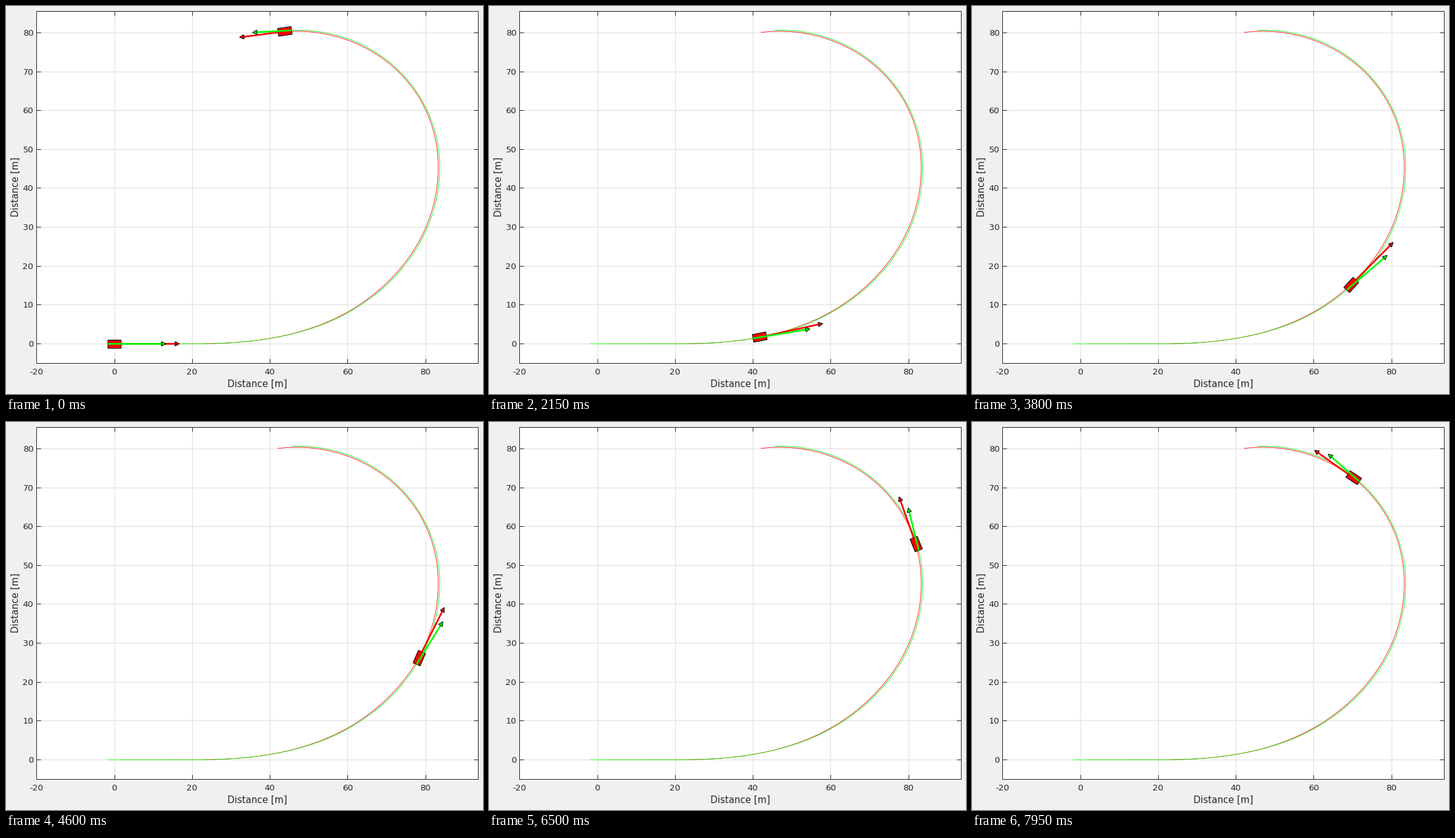
These frames come from a looping animation (756 by 615 pixels, 8 s). A matplotlib script:

```python
import numpy as np
import matplotlib.pyplot as plt
from matplotlib.animation import FuncAnimation
from matplotlib.patches import Polygon
from matplotlib.transforms import Affine2D

W, H, DPI = 756, 615, 96
SCALE = 6.163                       # pixels per metre
LEFT, RIGHT, TOP, BOTTOM = 48.4, 748.4, 8.4, 566.4
X0, Y0 = LEFT + 20 * SCALE, 534.95  # pixel position of the origin
DT = 1 / 15                         # simulated seconds per frame
LENGTH, WIDTH = 3.5, 2.0
INK, RED, GREEN = "#262626", "#ff0000", "#00ff00"

plt.rcParams["font.family"] = "DejaVu Sans"

# waypoints of the car's centre: time step, x, y
T, X, Y = np.array([(0, 0, 0), (14, 14, 0), (33, 32.93, 0.5),
                    (59, 57.43, 6.76), (91, 78.43, 26.16), (129, 82, 55.49),
                    (158, 70.31, 72.55), (199, 43.86, 80.35)]).T
T = T * DT
V_START, V_END = (15, 0), (-9.98, -0.9)


def spline(p, v0, v1):
    """Clamped cubic spline through p at times T: value and derivative."""
    h, n = np.diff(T), len(T)
    slope = np.concatenate([[v0], np.diff(p) / h, [v1]])
    a = np.zeros((n, n))
    for i, step in enumerate(h):
        a[i:i + 2, i:i + 2] += step * np.array([[2, 1], [1, 2]])
    m = np.linalg.solve(a, 6 * np.diff(slope))

    def at(t):
        i = np.clip(np.searchsorted(T, t, side="right") - 1, 0, n - 2)
        s, lin = t - T[i], (p[i + 1] - p[i]) / h[i]
        jerk = (m[i + 1] - m[i]) / h[i]
        v = lin - h[i] * (2 * m[i] + m[i + 1]) / 6
        return (p[i] + s * (v + s * (m[i] / 2 + s * jerk / 6)),
                v + s * (m[i] + s * jerk / 2))
    return at


path_x = spline(X, V_START[0], V_END[0])
path_y = spline(Y, V_START[1], V_END[1])


def heading(t):
    """Yaw rate ramps up, holds, then eases off: angle and rate."""
    angle = rate = 0
    for start, gain in ((0.95, 6.5), (3.704, -6.5), (10.53, -2)):
        s = np.maximum(t - start, 0)
        angle, rate = angle + gain * s ** 2 / 2, rate + gain * s
    return np.radians(angle), np.radians(rate)


def state(t):
    """Front and rear points with velocities, and the unit heading."""
    x, vx = path_x(t)
    y, vy = path_y(t)
    th, w = heading(t)
    pos, vel = np.array([x, y]), np.array([vx, vy])
    ahead = np.array([np.cos(th), np.sin(th)])
    arm = LENGTH / 2 * ahead
    spin = LENGTH / 2 * w * np.array([-np.sin(th), np.cos(th)])
    return pos + arm, vel + spin, pos - arm, vel - spin, ahead


fig = plt.figure(figsize=(W / DPI, H / DPI), dpi=DPI, facecolor="#f0f0f0")
ax = fig.add_axes([LEFT / W, 1 - BOTTOM / H,
                   (RIGHT - LEFT) / W, (BOTTOM - TOP) / H])
ax.set_xlim((LEFT - X0) / SCALE, (RIGHT - X0) / SCALE)
ax.set_ylim((Y0 - BOTTOM) / SCALE, (Y0 - TOP) / SCALE)
ax.set_autoscale_on(False)
ax.set_xticks(range(-20, 81, 20))
ax.set_yticks(range(0, 81, 10))
ax.tick_params(direction="in", length=5.25, width=0.75, color=INK,
               top=True, right=True, labelbottom=False, labelleft=False)
ax.grid(True, color="#dedede", lw=0.75)
ax.set_axisbelow(True)
for spine in ax.spines.values():
    spine.set(color=INK, linewidth=0.75)

# centre drawn shapes on the pixel row of the grid lines
data = ax.transData + Affine2D().translate(0, -0.5)


def label(x, y, text, size, ha="center", rotation=0):
    fig.text(x / W, 1 - y / H, text, size=size, color=INK, ha=ha,
             va="baseline", rotation=rotation, rotation_mode="anchor")


for v in range(-20, 81, 20):
    label(X0 + v * SCALE, 584, str(v), 10)
for v in range(0, 81, 10):
    label(43.5, Y0 + 5 - v * SCALE, str(v), 10, ha="right")
label(398.4, 604, "Distance [m]", 11)
label(20, 287, "Distance [m]", 11, rotation=90)

front, _, rear, _, _ = state(np.linspace(0, T[-1], 600))
for track, color in ((front, RED), (rear, GREEN)):
    ax.plot(*track, color=color, lw=0.6, zorder=2.1, transform=data)


class Arrow:
    HEAD, HALF = 1.13, 0.57

    def __init__(self, color, z):
        self.shaft, = ax.plot([], [], color=color, lw=2, zorder=z,
                              solid_capstyle="butt", transform=data)
        self.head = Polygon(np.zeros((3, 2)), fc=color, ec="black", lw=0.75,
                            zorder=z + 0.1, transform=data)
        ax.add_patch(self.head)
        self.parts = [self.shaft, self.head]

    def place(self, start, vel):
        d = vel / np.hypot(*vel)
        side = self.HALF * np.array([-d[1], d[0]])
        tip = start + vel
        base = tip - self.HEAD * d
        self.shaft.set_data(*zip(start, base))
        self.head.set_xy([tip, base + side, base - side])


class Car:
    def __init__(self):
        self.body = Polygon(np.zeros((4, 2)), fc=RED, ec="black", lw=0.8,
                            zorder=3, transform=data)
        ax.add_patch(self.body)
        self.front = Arrow(RED, 4)
        self.rear = Arrow(GREEN, 5)
        self.parts = [self.body, *self.front.parts, *self.rear.parts]

    def place(self, t):
        f, vf, r, vr, ahead = state(t)
        side = WIDTH / 2 * np.array([-ahead[1], ahead[0]])
        self.body.set_xy([f + side, f - side, r - side, r + side])
        self.front.place(f, vf)
        self.rear.place(r, vr)

    def show(self, on):
        for part in self.parts:
            part.set_visible(on)


car, parked = Car(), Car()
parked.place(T[-1])


def draw(n):
    car.place(max(0, n - 1) * DT)
    parked.show(n == 0)
    return car.parts + parked.parts


anim = FuncAnimation(fig, draw, frames=160, interval=50, repeat=True,
                     repeat_delay=0, blit=False, init_func=lambda: draw(0))
plt.show()
```
